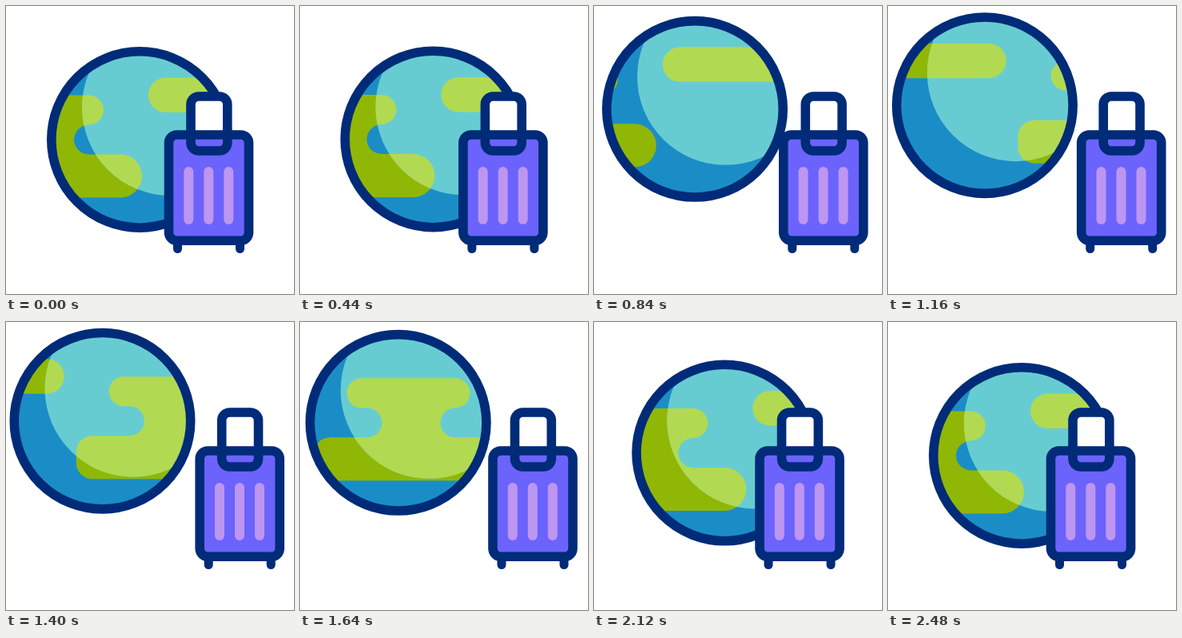
An HTML page with a canvas that plays this animation: 360 px wide and 360 px high, repeating every 2600 ms.

```html
<!DOCTYPE html>
<html lang="en">
<head>
<meta charset="utf-8">
<title>Travel</title>
<style>
  html, body { margin: 0; width: 100%; height: 100%; overflow: hidden; background: #fff; }
  canvas { display: block; width: 360px; height: 360px; }
</style>
</head>
<body>
<canvas id="stage"></canvas>
<script>
const LOOP = 2600;
const SIZE = 360;
const PERIOD = 430; // width of the repeating land texture
const NAVY = '#002b78';
const DARK = { sea: '#1b8dc6', land: '#90b706' };
const LIGHT = { sea: '#67ccd2', land: '#b1da52' };

const canvas = document.getElementById('stage');
const ctx = canvas.getContext('2d');
const ratio = window.devicePixelRatio || 1;
canvas.width = canvas.height = SIZE * ratio;

// Smooth monotone curve through [time, value] points.
function curve(points) {
  const slope = i => (points[i + 1][1] - points[i][1]) / (points[i + 1][0] - points[i][0]);
  const tangents = points.map((_, i) => {
    if (i === 0 || i === points.length - 1) return 0;
    const a = slope(i - 1), b = slope(i);
    return a * b > 0 ? 2 * a * b / (a + b) : 0;
  });
  return t => {
    if (t <= points[0][0]) return points[0][1];
    const i = points.findIndex(p => p[0] > t) - 1;
    if (i < 0) return points[points.length - 1][1];
    const [t0, v0] = points[i], [t1, v1] = points[i + 1];
    const h = t1 - t0, s = (t - t0) / h, r = 1 - s;
    return v0 * (1 + 2 * s) * r * r + v1 * s * s * (3 - 2 * s)
      + h * s * r * (tangents[i] * r - tangents[i + 1] * s);
  };
}

const spread = curve([
  [160, 0], [440, 0.012], [520, 0.14], [600, 0.4], [680, 0.665], [760, 0.79],
  [840, 0.88], [1000, 0.955], [1160, 0.99], [1320, 1], [1400, 1], [1560, 0.992],
  [1640, 0.952], [1800, 0.575], [1840, 0.465], [1880, 0.355], [1960, 0.21],
  [2040, 0.125], [2200, 0.05], [2360, 0.012], [2480, 0]
]);

const spin = curve([
  [200, 0], [440, 1], [640, 15], [840, 51], [1160, 148],
  [1640, 295], [1840, 350], [2080, 400], [2280, 423], [2480, PERIOD]
]);

function disc(x, y, r) {
  ctx.beginPath();
  ctx.arc(x, y, r, 0, Math.PI * 2);
}

function box(x, y, w, h, r) {
  ctx.beginPath();
  ctx.roundRect(x, y, w, h, r);
}

function line(x, y0, y1) {
  ctx.beginPath();
  ctx.moveTo(x, y0);
  ctx.lineTo(x, y1);
  ctx.stroke();
}

function land(x) {
  const up = -Math.PI / 2, down = Math.PI / 2, r = 18.5;
  ctx.beginPath();
  ctx.arc(x - r, -37, r, up, down);
  ctx.arc(x - r, 0, r, up, down, true);
  ctx.arc(x + 21, 45.5, 27, up, down);
  ctx.arc(x - 175, 52.5, 20, down, Math.PI);
  ctx.arc(x - 175, 38.5, 20, Math.PI, -up * 3);
  ctx.arc(x - 128.5, 0, r, down, up, true);
  ctx.arc(x - 135.5, -37, r, down, -up * 3);
  ctx.closePath();
  ctx.fill();
  box(x + 56, -77.5, PERIOD - 266, 43.5, 21.75);
  ctx.fill();
}

function surface(colors, shift) {
  ctx.fillStyle = colors.sea;
  ctx.fillRect(-120, -120, 240, 240);
  ctx.fillStyle = colors.land;
  land(-45 - shift);
  land(-45 - shift + PERIOD);
}

function globe(x, y, shift) {
  ctx.save();
  ctx.translate(x, y);
  ctx.save();
  disc(0, 0, 110);
  ctx.clip();
  surface(DARK, shift);
  disc(38.5, -40.5, 110.5);
  ctx.clip();
  surface(LIGHT, shift);
  ctx.restore();
  ctx.strokeStyle = NAVY;
  ctx.lineWidth = 11.6;
  disc(0, 0, 110.2);
  ctx.stroke();
  ctx.restore();
}

function suitcase(x) {
  ctx.save();
  ctx.translate(x, 0);
  ctx.lineCap = 'round';
  ctx.strokeStyle = NAVY;
  ctx.lineWidth = 11;
  line(214.5, 293, 303.5);
  line(292.5, 293, 303.5);

  ctx.fillStyle = '#fff';
  box(231, 113, 46, 68, 10);
  ctx.fill();

  ctx.lineWidth = 11.6;
  ctx.fillStyle = '#6b63fb';
  box(203.5, 161, 100, 132.3, 10);
  ctx.fill();
  ctx.stroke();

  box(231, 113, 45.8, 68, 10);
  ctx.stroke();

  ctx.strokeStyle = '#bd96f2';
  ctx.lineWidth = 12;
  for (const stripe of [228.3, 253.3, 278.3]) line(stripe, 207, 267);
  ctx.restore();
}

function draw(now) {
  const t = now % LOOP;
  const away = spread(t);
  ctx.setTransform(ratio, 0, 0, ratio, 0, 0);
  ctx.fillStyle = '#fff';
  ctx.fillRect(0, 0, SIZE, SIZE);
  globe(167 - 46.5 * away, 167 - 43.3 * away, spin(t));
  suitcase(38.7 * spread(t - 24));
  requestAnimationFrame(draw);
}

draw(0);
</script>
</body>
</html>
```
